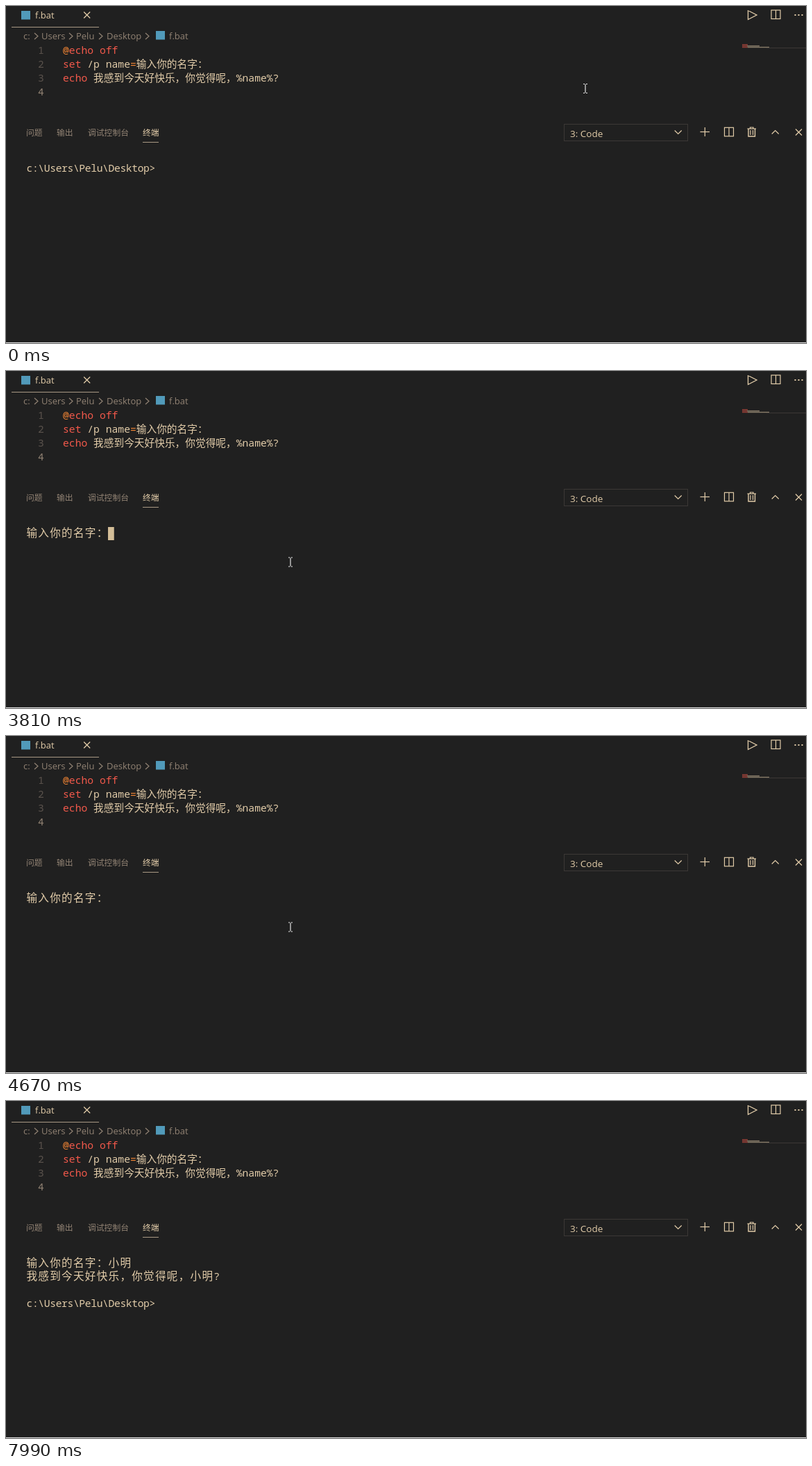
Write an HTML page with a canvas that moves like this. It is 1153 by 486 pixels and loops after 8.11 s.

```html
<!DOCTYPE html>
<html lang="zh-CN">
<head>
<meta charset="utf-8">
<title>Batch script demo</title>
<style>
  html, body { margin: 0; width: 100%; height: 100%; overflow: hidden; background: #202020; }
  canvas { display: block; width: 1153px; height: 486px; }
</style>
</head>
<body>
<canvas id="stage" width="1153" height="486"></canvas>
<script>
const ctx = document.getElementById('stage').getContext('2d');
const LOOP = 8110;
const FG = '#e2cca9', RED = '#f2594b', ORANGE = '#f28534', DIM = '#928374', BLUE = '#519aba';
const CJK = '"Noto Sans CJK SC"';
const MONO = `"Noto Sans Mono", ${CJK}, monospace`;
const UI = `"Open Sans", ${CJK}, sans-serif`;
const PROMPT = 'c:\\Users\\Pelu\\Desktop>';
const QUESTION = '输入你的名字：', NAME = '小明';
const ANSWER = `我感到今天好快乐，你觉得呢，${NAME}?`;
const CELL = 8.43, ROW = 19.5, LEFT = 29.5, TOP = 225;

const isWide = ch => ch.charCodeAt(0) > 0x2e7f;
const cells = s => [...s].reduce((n, ch) => n + (isWide(ch) ? 2 : 1), 0);

function rect(x, y, w, h, color) {
  ctx.fillStyle = color;
  ctx.fillRect(x, y, w, h);
}

function text(s, x, y, color, font, align = 'left') {
  ctx.font = font;
  ctx.fillStyle = color;
  ctx.textAlign = align;
  ctx.fillText(s, x, y);
}

// Polyline through [x, y] points, optionally closed and filled.
function line(points, color, width = 1.2, fill = null) {
  ctx.beginPath();
  points.forEach(([x, y]) => ctx.lineTo(x, y));
  if (fill) {
    ctx.closePath();
    ctx.fillStyle = fill;
    ctx.fill();
  }
  ctx.strokeStyle = color;
  ctx.lineWidth = width;
  ctx.stroke();
}

function box(x, y, w, h, color, width = 1) {
  ctx.strokeStyle = color;
  ctx.lineWidth = width;
  ctx.strokeRect(x, y, w, h);
}

function chevron(x, y, dx, dy, color) {
  line(dx ? [[x - dx, y - 4.5], [x + dx, y], [x - dx, y + 4.5]]
          : [[x - 5, y - dy], [x, y + dy], [x + 5, y - dy]], color);
}

function cross(x, y, r) {
  line([[x - r, y - r], [x + r, y + r]], FG);
  line([[x - r, y + r], [x + r, y - r]], FG);
}

function splitIcon(x, y) {
  box(x, y, 13, 12.5, FG, 1.2);
  line([[x + 6.5, y], [x + 6.5, y + 12.5]], FG);
}

function drawHeader(pressed) {
  const font = `13px ${UI}`;
  rect(22, 7, 13, 12.5, BLUE);
  text('f.bat', 42, 18, FG, font);
  cross(116.7, 13, 4.5);
  rect(8, 30, 126, 1, '#a89984');

  [['c:', 25], ['Users', 51], ['Pelu', 101], ['Desktop', 145], ['f.bat', 235]]
    .forEach(([s, x]) => text(s, x, 48, DIM, font));
  [43.5, 93.5, 136.5, 203.5].forEach(x => chevron(x, 43.5, 2.5, 0, DIM));
  rect(216, 36, 13, 12.5, BLUE);

  const color = pressed ? '#a89984' : FG;
  line([[1069.5, 6.5], [1082, 13], [1069.5, 19.5], [1069.5, 6]], color, 1.3);
  splitIcon(1103, 6);
  [1137.5, 1142.5, 1147.5].forEach(x => rect(x - 1, 12, 2, 2, FG));
}

function drawEditor() {
  const font = `500 14.7px ${MONO}`;
  const lines = [
    [['@', ORANGE], ['echo off', RED]],
    [['set', RED], [' /p name', FG], ['=', ORANGE], [QUESTION, FG]],
    [['echo', RED], [' 我感到今天好快乐，你觉得呢，%name%?', FG]],
    []
  ];
  lines.forEach((parts, i) => {
    const y = 69 + i * 19.9;
    text(i + 1, 54.7, y, i === 3 ? DIM : '#5a524c', `14.7px ${MONO}`, 'right');
    let x = 82;
    for (const [s, color] of parts) {
      text(s, x, y, color, font);
      x += ctx.measureText(s).width;
    }
  });

  // Minimap
  ctx.globalAlpha = 0.55;
  [[4, 4], [3, 18], [4, 31]].forEach(([red, rest], i) => {
    rect(1061, 55 + i * 1.9, red + 4, 1.4, RED);
    rect(1065 + red, 55 + i * 1.9, rest - 4 + (i ? 4 : 0), 1.4, FG);
  });
  ctx.globalAlpha = 1;
  rect(1096, 60, 57, 1, '#3c3836');
}

function drawPanelBar() {
  const font = `11.8px ${CJK}, sans-serif`;
  [['问题', 29], ['输出', 73], ['调试控制台', 118], ['终端', 197]]
    .forEach(([s, x], i) => text(s, x, 187.2, i === 3 ? FG : DIM, font));
  rect(197, 196, 23, 1, '#a89984');

  box(804.5, 170.5, 178, 24, '#3c3836');
  text('3: Code', 813, 188.5, FG, `13.5px ${UI}`);
  chevron(968.7, 182, 0, 2.5, FG);
  line([[1000.5, 181.5], [1014, 181.5]], FG);
  line([[1007.3, 175], [1007.3, 188]], FG);
  splitIcon(1035.5, 175.3);
  line([[1068.5, 177], [1081, 177]], FG);
  line([[1072.5, 177], [1072.5, 175], [1077, 175], [1077, 177]], FG);
  line([[1070, 177], [1070, 188], [1079.5, 188], [1079.5, 177]], FG, 1.4);
  [1073, 1076.5].forEach(x => line([[x, 179], [x, 186]], FG));
  chevron(1108.7, 182, 0, -2.5, FG);
  cross(1142.5, 182, 4.5);
}

// Places each character on the terminal grid.
function termText(s, row) {
  let x = LEFT;
  for (const ch of s) {
    const wide = isWide(ch);
    text(ch, x, TOP + row * ROW + 13.5, FG, wide ? `15.6px ${CJK}, sans-serif` : `500 14.7px ${MONO}`);
    x += CELL * (wide ? 2 : 1);
  }
}

function terminalLines(t) {
  if (t < 1410) return [PROMPT];
  if (t < 1460) return [''];
  if (t < 4730) return [QUESTION];
  if (t < 5070) return [QUESTION + NAME];
  return [QUESTION + NAME, ANSWER, '', PROMPT];
}

const caretSpans = [[690, 1290], [1460, 2110], [2610, 3190], [3810, 4400],
                    [4730, 5630], [6280, 6870], [7450, 7990]];

function drawTerminal(t) {
  const lines = terminalLines(t);
  lines.forEach(termText);
  if (caretSpans.some(([on, off]) => t >= on && t < off)) {
    const row = lines.length - 1;
    rect(LEFT + cells(lines[row]) * CELL - 0.5, Math.round(TOP + row * ROW - 0.5), CELL + 0.3, 19, '#d4be98');
  }
}

const typing = [
  [3990, 'x', '下 小 想 像 先 向 行'],
  [4050, 'xi', '熙 吸 西 细 稀 锡 习'],
  [4200, 'xia', '下 夏 吓 虾 瞎 峡 霞'],
  [4240, 'xiao', '小 笑 校 效 消 晓 销'],
  [4280, 'xiaom', '小明 小猫 小妹 小麦 小毛 小门 小名'],
  [4320, 'xiaomi', '小谜 小蜜 小秘 小觅 小密 小迷 小幂'],
  [4360, 'xiaomin', '小民 小敏 晓敏 小皿 小闽 小悯 小珉'],
  [4400, 'xiaoming', '小明 小名 晓明 小鸣 晓鸣 小铭 小茗']
];
const typingEnd = 4670;

function drawInputMethod(t) {
  const step = typing.filter(([at]) => t >= at).pop();
  if (!step || t >= typingEnd) return;
  const [, letters, list] = step;
  rect(153, 225, letters.length * 8.82 + 0.5, 19, '#000');
  text(letters, 153.3, 238.5, '#fff', `600 14.7px ${MONO}`);

  const words = list.split(' ');
  const widths = words.map(w => 64.1 + 18.5 * (w.length - 1));
  const total = widths.reduce((a, b) => a + b, 0);
  rect(150, 244, total + 46.5, 46, '#fff');
  let x = 150;
  words.forEach((word, i) => {
    if (!i) rect(x, 244, widths[0], 46, '#0078d7');
    text(i + 1, x + 17, 274.5, i ? '#767676' : '#fff', `13px ${UI}`);
    text(word, x + 28.7, 275, i ? '#000' : '#fff', `19px ${CJK}, sans-serif`);
    x += widths[i];
  });
  const edge = Math.round(x) - 0.5;
  box(150.5, 244.5, edge + 46 - 150.5, 45, '#0078d7');
  line([[edge, 244], [edge, 290]], '#0078d7', 1);
  drawSmile(edge + 23.5, 267);
}

function drawSmile(x, y) {
  ctx.strokeStyle = '#000';
  ctx.lineWidth = 1.2;
  ctx.beginPath();
  ctx.arc(x, y, 9, 0, 7);
  ctx.stroke();
  ctx.beginPath();
  ctx.arc(x, y, 5.3, 0.35, Math.PI - 0.35);
  ctx.stroke();
  rect(x - 4.2, y - 4, 2, 2, '#000');
  rect(x + 2.2, y - 4, 2, 2, '#000');
}

const pointers = {
  beam() {
    line([[0, -6], [0, 6]], '#e8e8e8', 1.2);
    [-6.5, 6.5].forEach(y => {
      line([[-3, y], [-0.8, y]], '#e8e8e8', 1);
      line([[0.8, y], [3, y]], '#e8e8e8', 1);
    });
  },
  arrow() {
    line([[0.5, 0], [0.5, 13.5], [3.6, 10.8], [5.7, 15.6], [8, 14.6], [6, 10], [10, 10]], '#000', 1, '#fff');
  },
  hand() {
    const outline = new Path2D('M-4 1 Q-2.5 -1 -1 1 V7 Q1 5.5 2.5 7.5 Q4 6.5 5 8 Q7 7.5 7 9.5' +
      'V14 L5 18 V20 H-2.5 V18 L-7 12 Q-7.5 9.5 -5.5 10 L-4 11.5 Z');
    ctx.fillStyle = '#fff';
    ctx.strokeStyle = '#000';
    ctx.lineWidth = 1;
    ctx.fill(outline);
    ctx.stroke(outline);
    [0.2, 2.8].forEach(x => line([[x, 12.5], [x, 16]], '#000', 0.8));
  }
};

// Each move: start, end, number of steps, from, to.
const moves = [
  [60, 860, 16, [835, 119], [1067.5, 17]],
  [890, 890, 1, [1067.5, 17], [1071.5, 15]],
  [1890, 2170, 6, [1071.5, 15], [410, 275.5]],
  [6810, 7620, 17, [408, 275], [1066, 482]]
];
const ease = p => p * p * (3 - 2 * p);

function pointerPosition(t) {
  const move = moves.filter(([start]) => t >= start).pop();
  if (!move) return moves[0][3];
  const [start, end, steps, from, to] = move;
  if (t >= end) return to;
  const gap = (end - start) / (steps - 1);
  const p = ease(Math.floor((t - start) / gap) / (steps - 1));
  return from.map((v, i) => v + (to[i] - v) * p);
}

function pointerKind(t, x, y) {
  if (t >= 890 && t < 1920) return 'hand';
  if (t >= typing[0][0] && t < typingEnd) return 'arrow';
  return y < 50 || (y > 165 && y < 205) ? 'arrow' : 'beam';
}

function drawPointer(t) {
  if (t >= 7680) return;
  const [x, y] = pointerPosition(t);
  const kind = pointerKind(t, x, y);
  ctx.save();
  ctx.translate(kind === 'arrow' && t > 3000 ? x - 1.5 : x, y);
  pointers[kind]();
  ctx.restore();
}

function draw(t) {
  rect(0, 0, 1153, 486, '#202020');
  drawHeader(t >= 1290 && t < 1520);
  drawEditor();
  drawPanelBar();
  drawTerminal(t);
  drawInputMethod(t);
  rect(0, 485, 1153, 1, '#d8d8d8');
  drawPointer(t);
}

const startTime = performance.now();
function tick() {
  draw((performance.now() - startTime) % LOOP);
  requestAnimationFrame(tick);
}
tick();
</script>
</body>
</html>
```
